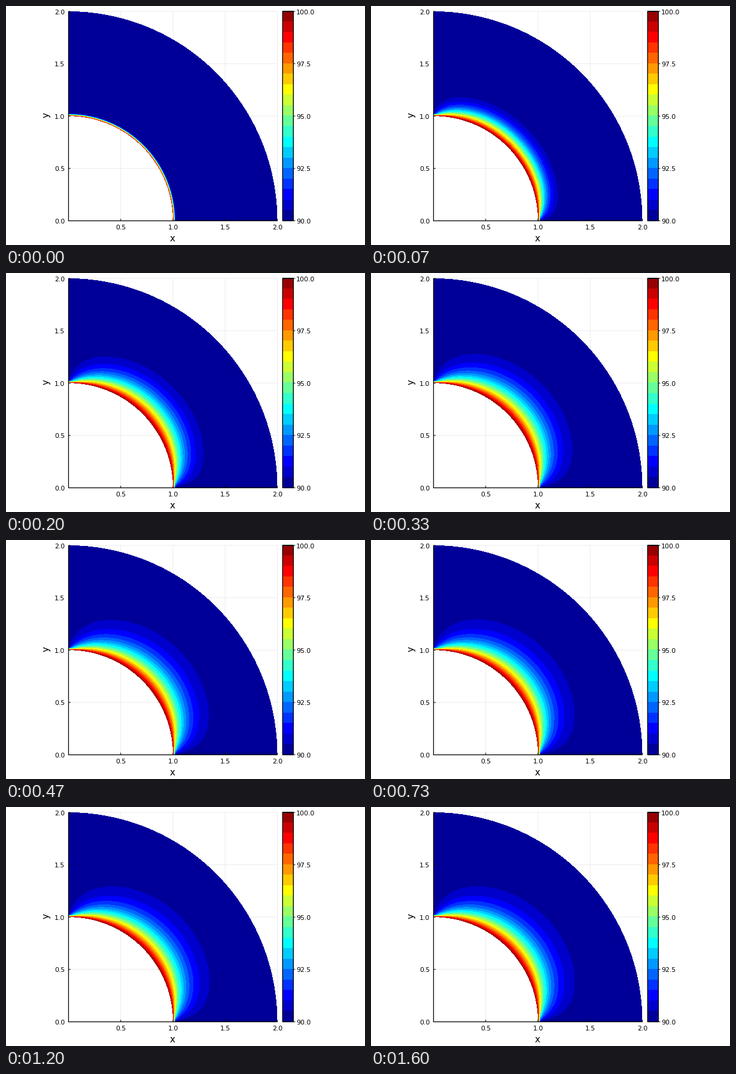
Animation of 600x400 px, one loop 2270 ms. Source, as a matplotlib script:

```python
import numpy as np
import matplotlib.pyplot as plt
from matplotlib.animation import FuncAnimation

W, H, DPI = 600, 400, 100
X0, Y0 = 104.5, 359.5          # pixel position of the plot's (0, 0)
SX, SY = 174.5, 175.25         # pixels per unit
COLD, HOT, BANDS = 90.0, 100.0, 20
NR, NT = 40, 60                # cells along radius and angle
STATES, FRAME_TIME, SUBSTEPS = 25, 0.0092, 400
SPREAD, DRIFT = 10.3, 1.0      # angular diffusion and drift
TICK_MS, LOOP_MS, RATE = 10, 2270, 15

plt.rcParams["font.family"] = "DejaVu Sans"


def jet(x):
    """Classic piecewise linear jet."""
    return np.stack([np.clip(1.5 - np.abs(4 * x - c), 0, 1) for c in (3, 2, 1)], axis=-1)


PALETTE = jet((np.arange(BANDS) + 0.5) / BANDS)


def solve():
    """Heat spreading from the inner arc, other edges kept cold."""
    dr, da = 1 / NR, np.pi / 2 / NT
    dt = FRAME_TIME / SUBSTEPS     # explicit scheme: stable below 3e-5
    r = np.linspace(1, 2, NR + 1)[1:-1, None]
    u = np.full((NR + 1, NT + 1), COLD)
    u[0] = HOT
    mid = u[1:-1, 1:-1]
    out, inn = u[2:, 1:-1], u[:-2, 1:-1]
    left, right = u[1:-1, 2:], u[1:-1, :-2]
    states = [u.copy()]
    for _ in range(STATES - 1):
        for _ in range(SUBSTEPS):
            radial = (out - 2 * mid + inn) / dr**2 + (out - inn) / (2 * dr * r)
            angular = (left - 2 * mid + right) / da**2 + DRIFT * (left - right) / (2 * da)
            mid += dt * (radial + SPREAD * angular)
        states.append(u.copy())
    return states


# Pixel centres of the plot area in polar coordinates
px, py = np.meshgrid(np.arange(104, 454) + 0.5, np.arange(9, 360) + 0.5)
gx, gy = (px - X0) / SX, (Y0 - py) / SY
radius = np.hypot(gx, gy)
angle = np.clip(np.arctan2(gy, gx), 0, np.pi / 2)
inside = (radius >= 1) & (radius <= 2)
edge = inside & (py > 355.5)

fr = np.clip((radius - 1) * NR, 0, NR - 1e-6)
fa = np.clip(angle / (np.pi / 2) * NT, 0, NT - 1e-6)
ri, ai = fr.astype(int), fa.astype(int)
wr, wa = fr - ri, fa - ai


def paint(u):
    low = u[ri, ai] * (1 - wa) + u[ri, ai + 1] * wa
    high = u[ri + 1, ai] * (1 - wa) + u[ri + 1, ai + 1] * wa
    t = low * (1 - wr) + high * wr
    band = np.floor((t - COLD) / (HOT - COLD) * BANDS + 1e-9).astype(int)
    band = np.clip(band, 0, BANDS - 1)
    rgba = np.dstack([PALETTE[band], inside.astype(float)])
    rgba[edge & (band == 0), :3] = (0, 0, 0.54)
    return rgba


images = [paint(u) for u in solve()]

fig = plt.figure(figsize=(W / DPI, H / DPI), dpi=DPI, facecolor="white")
ax = fig.add_axes([0, 0, 1, 1])
ax.axis("off")


def line(xs, ys, color="black", width=1.0, z=5):
    ax.plot(xs, ys, color=color, lw=width * 72 / DPI, zorder=z,
            solid_capstyle="butt", solid_joinstyle="miter", snap=False)


def label(x, y, text, size=11, **kw):
    ax.text(x, y, text, fontsize=size * 72 / DPI, va="center_baseline", zorder=6, **kw)


field = ax.imshow(images[0], extent=(104, 454, 360, 9), interpolation="nearest",
                  aspect="auto", zorder=3)

# Axes, grid and ticks
right, top = X0 + 2 * SX, Y0 - 2 * SY
for k in range(5):
    v = k / 2
    x, y = X0 + v * SX, Y0 - v * SY
    if k:
        line([x, x], [Y0, top], "#ececec", z=1)
        line([x, x], [Y0, Y0 - 3.5])
        label(x, 370.5, f"{v:.1f}", ha="center")
        line([X0, right], [y, y], "#ececec", z=1)
        line([X0, X0 + 3.5], [y, y])
    label(98.5, y + 0.5, f"{v:.1f}", ha="right")
line([X0, X0], [top, Y0 + 0.5], width=1.3)
line([X0 - 0.5, right], [Y0, Y0], width=1.3)
label(278.5, 387.5, "x", 15.3, ha="center")
label(67, 184, "y", 15.3, ha="center", rotation=90)

# Colour bar
bar_l, bar_r = 462.3, 480.3
ax.imshow(PALETTE[::-1, None], extent=(bar_l, bar_r, Y0, top), interpolation="nearest",
          aspect="auto", zorder=3)
line([bar_l, bar_r, bar_r, bar_l, bar_l, bar_r], [top, top, Y0, Y0, top, top], width=1.4)
for k in range(5):
    y = Y0 - k * SY / 2
    line([bar_r, bar_r + 3], [y, y])
    label(485, y + 0.5, f"{COLD + 2.5 * k:.1f}", ha="left")

ax.set_xlim(0, W)
ax.set_ylim(H, 0)


def update(i):
    step = int((i + 0.5) * TICK_MS * RATE / 1000)
    field.set_data(images[min(step, STATES - 1)])
    return (field,)


anim = FuncAnimation(fig, update, frames=LOOP_MS // TICK_MS, interval=TICK_MS,
                     repeat=True, repeat_delay=0, blit=False)
plt.show()
```
